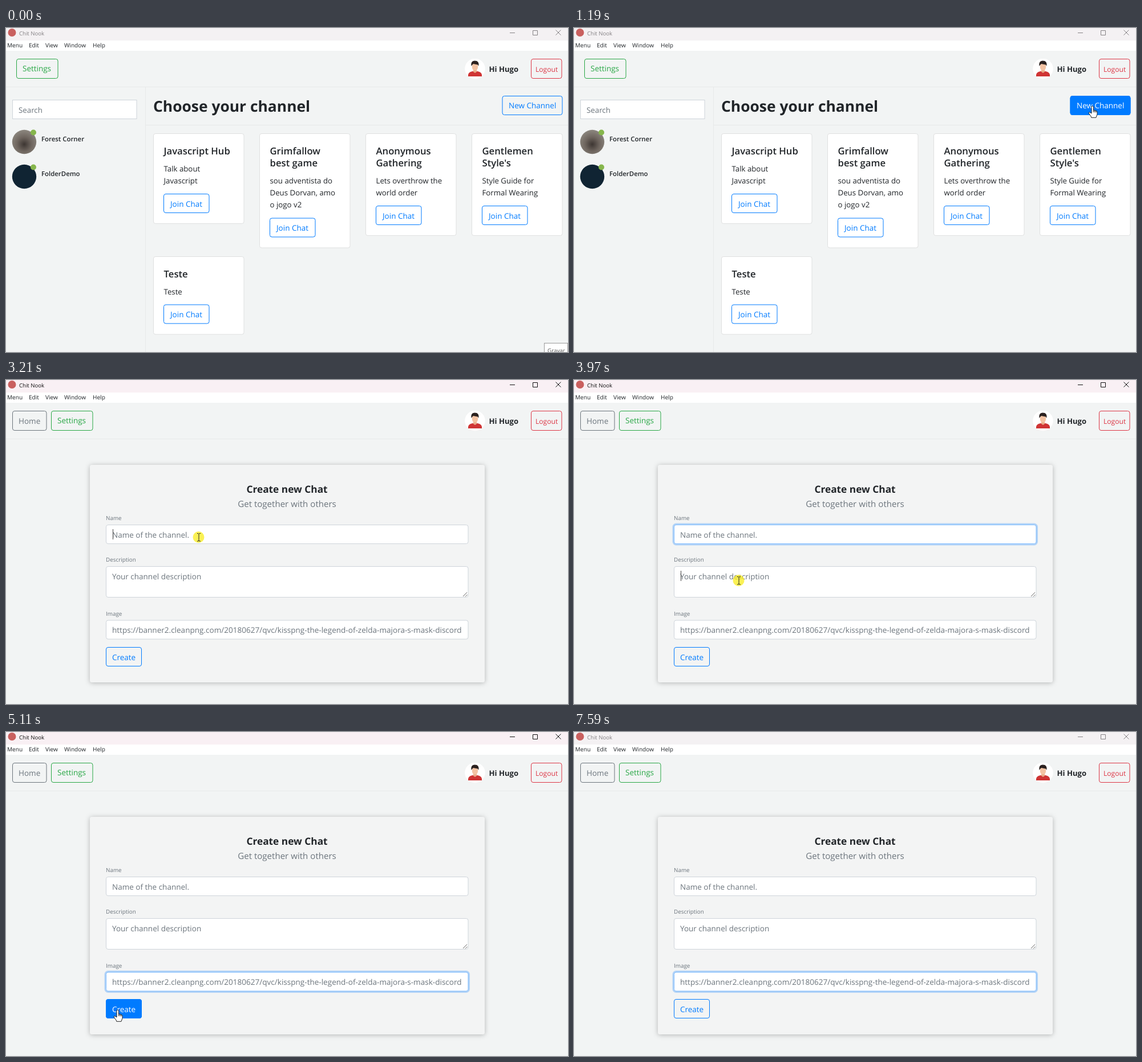
Recreate the animation shown at these times as an HTML page. Size 985x569 px, loop 7680 ms.

```html
<!DOCTYPE html>
<html lang="en">
<head>
<meta charset="utf-8">
<title>Chat channels</title>
<style>
  html, body { margin: 0; height: 100%; overflow: hidden; background: #f2f4f4; }
  svg { display: block; width: 985px; height: 569px; text-rendering: geometricPrecision;
        font-family: "Open Sans", "Noto Sans", sans-serif; }
  .panel { filter: drop-shadow(0 1px 4px rgba(0, 0, 0, .26)); }
</style>
</head>
<body>
<svg id="stage" viewBox="0 0 985 569"></svg>
<script>
const LOOP = 7680, BLUE = '#007bff', GREY = '#6c757d', INK = '#212529', GREEN = '#28a745', RED = '#dc3545';

// Drawing helpers, all returning SVG markup
const text = (x, y, s, size = 13.5, fill = INK, weight = 400, extra = '') =>
  `<text x="${x}" y="${y}" font-size="${size}" fill="${fill}" font-weight="${weight}" ${extra}>${s}</text>`;
const rect = (x, y, w, h, fill, stroke = 'none', r = 0, extra = '') =>
  `<rect x="${x}" y="${y}" width="${w}" height="${h}" rx="${r}" fill="${fill}" stroke="${stroke}" ${extra}/>`;
const circle = (x, y, r, fill) => `<circle cx="${x}" cy="${y}" r="${r}" fill="${fill}"/>`;
const path = (d, extra) => `<path d="${d}" ${extra}/>`;
const line = (d, color) => path(d, `fill="none" stroke="${color}"`);
const group = (id, ...parts) => `<g id="${id}">${parts.join('')}</g>`;
const button = (x, y, w, h, tx, ty, s, color, size, fill = 'none') =>
  rect(x, y, w, h, fill, fill === 'none' ? color : fill, 3.5) +
  text(tx, ty, s, size, fill === 'none' ? color : '#fff');

const settings = x => button(x + .5, 54.5, 72.5, 34, x + 11, 76, 'Settings', GREEN);

function card(x, y, h, title, body) {
  let base = y + 36.5;
  let out = rect(x + .5, y + .5, 158.5, h, '#fff', '#dfe0e0', 3.5);
  title.forEach((s, i) => out += text(x + 18.5, base + i * 21, s, 16.7, INK, 600));
  base += title.length * 21 + 9;
  body.forEach((s, i) => out += text(x + 18.5, base + i * 21.2, s, 13.25));
  return out + button(x + 18.5, y + h - 51.5, 79.5, 33, x + 30, y + h - 29.5, 'Join Chat', BLUE);
}

function contact(y, name, picture) {
  return circle(32, y, 21.2, picture) + circle(48, y - 16.5, 5, '#86b64c') +
    text(62, y - 1.5, name, 11.4, INK, 600);
}

function field(id, y, h, label, hint, size = 13.5) {
  return text(175, y - 8, label, 9.9, GREY) +
    rect(175.5, y + .5, 634.5, h, '#fff', '#ced4da', 3.5) +
    group(id + 'Ring',
      rect(174, y - 1, 637.5, h + 3, 'none', BLUE, 5, 'stroke-width="3" stroke-opacity=".27"'),
      rect(175.5, y + .5, 634.5, h, '#fff', '#80bdff', 3.5)) +
    text(186, y + 22.5, hint, size, GREY) +
    group(id + 'Caret', line(`M187.5 ${y + 8}v18`, '#444'));
}

const chrome =
  rect(0, 0, 985, 22, '#f4f1f3') +
  group('active', rect(0, 0, 985, 22, '#f9f0f4')) +
  circle(10.5, 8, 7, '#c9605f') +
  group('title',
    text(23, 12.5, 'Chit Nook', 9.6, 'currentColor'),
    line('M883 8.5h9M923.5 4.5h8v8h-8zM963.5 3.5l9 9m0-9l-9 9', 'currentColor')) +
  rect(0, 22, 985, 18, '#fff') +
  [[2, 'Menu'], [40, 'Edit'], [69, 'View'], [102, 'Window'], [152, 'Help']]
    .map(([x, s]) => text(x, 34, s, 10.1)).join('') +
  line('M0 103.5H985', '#e7e9e9') +
  circle(822, 71.5, 17.8, '#fff') +
  path('M810 85V82Q811 77 818 76H826Q833 77 834 82V85Z', 'fill="#cf3434"') +
  path('M819 72h6v5l-3 2l-3-2z', 'fill="#e9ab88"') +
  `<ellipse cx="822" cy="68" rx="5.2" ry="7" fill="#f4c3a3"/>` +
  path('M815.5 67Q814 58 821 57.5Q830 57 828.3 67L826.8 64.5L819 63L817 65Z', 'fill="#2b211f"') +
  text(846.5, 77, 'Hi Hugo', 13.1, INK, 700) +
  button(920.5, 54.5, 53.5, 34, 928, 77, 'Logout', RED, 12.1);

const home = group('home',
  settings(18),
  line('M244.5 104V569M245 170.5H985', '#e7e9e9'),
  rect(11.5, 126.5, 217.5, 33, '#fff', '#ced4da'),
  text(22, 149, 'Search', 13.3, GREY),
  contact(200, 'Forest Corner', 'url(#fur)'),
  contact(261, 'FolderDemo', '#102433'),
  text(258, 147, 'Choose your channel', 26.4, INK, 700),
  button(870, 119.5, 105, 33, 881, 141, 'New Channel', BLUE),
  group('newHover', button(870, 119.5, 105, 33, 881, 141, 'New Channel', BLUE, 13.5, BLUE)),
  card(258, 185, 158, ['Javascript Hub'], ['Talk about', 'Javascript']),
  card(444, 185, 200.5, ['Grimfallow', 'best game'], ['sou adventista do', 'Deus Dorvan, amo', 'o jogo v2']),
  card(630, 185, 179, ['Anonymous', 'Gathering'], ['Lets overthrow the', 'world order']),
  card(816, 185, 179, ['Gentlemen', "Style's"], ['Style Guide for', 'Formal Wearing']),
  card(258, 401, 136.5, ['Teste'], ['Teste']),
  group('tip', rect(943.5, 553.5, 41, 20, '#fff', '#9a9a9a'), text(949, 570, 'Gravar', 9.8, '#555')));

const form = group('form',
  button(11.5, 54.5, 59.5, 34, 22, 77, 'Home', GREY),
  settings(79),
  rect(147, 149, 692, 382, '#f3f4f4', 'none', 3.5, 'class="panel"'),
  text(492.5, 198, 'Create new Chat', 17.3, INK, 700, 'text-anchor="middle"'),
  text(492.5, 222.5, 'Get together with others', 15.1, GREY, 400, 'text-anchor="middle"'),
  field('name', 254, 33, 'Name', 'Name of the channel.'),
  field('about', 327, 54, 'Description', 'Your channel description'),
  line('M801 380l7-7M805 380.5l3.5-3.5', '#666'),
  field('image', 421.5, 33, 'Image',
    'https://banner2.cleanpng.com/20180627/qvc/kisspng-the-legend-of-zelda-majora-s-mask-discord', 13.55),
  button(175.5, 469.5, 62, 33, 186, 491.5, 'Create', BLUE),
  group('createHover', button(175.5, 469.5, 62, 33, 186, 491.5, 'Create', BLUE, 13.5, BLUE)));

const pointer = group('pointer',
  group('glow', circle(-.5, 0, 10, 'rgba(250,236,20,.72)')),
  group('arrow', path('M.5 .5V14.5L3.7 11.5L5.8 16.2L8 15.2L6 10.7H10.2Z',
    'fill="#fff" stroke="#222" stroke-linejoin="round"')),
  group('hand', path('M-1 1Q.7-1.2 2.4 1V7.2L6 8Q9.2 8.4 9 11V14.5L7 20.3H-1.2Q-2-17 -2 18L-5.6 13Q-6.3 10.8 -4.3 10.8L-1 13Z'
    .replace('Q-2-17 -2 18', 'L-2 18'), 'fill="#fff" stroke="#222" stroke-linejoin="round"'),
    line('M2.4 7V11M4.6 8V11.2M6.8 8.4V11.4', '#222')),
  group('beam', line('M-3 -6.5H-1L0 -5.5L1 -6.5H3M0 -5.5V6M-3 7H-1L0 6L1 7H3', '#222')));

const stage = document.getElementById('stage');
stage.innerHTML = `<defs><radialGradient id="fur" cx=".5" cy=".6" r=".6">
  <stop offset="0" stop-color="#3d3632"/><stop offset=".5" stop-color="#6f665f"/>
  <stop offset="1" stop-color="#8d8880"/></radialGradient></defs>` + chrome + home + form + pointer;

const $ = id => document.getElementById(id);
const show = (id, v) => $(id).setAttribute('opacity', +v);
const clamp = v => Math.min(1, Math.max(0, v));
const within = (t, a, b) => t >= a && t < b;
// Rises over 150 ms after a, falls over 150 ms after b
const fade = (t, a, b = Infinity) => clamp((t - a) / 150) - clamp((t - b) / 150);
const blink = (t, a, b = Infinity) => within(t, a, b) && (t - a) % 1075 < 530;

// Pointer moves: start, end, control point, end point
const moves = [
  [70, 580, 790, 180, 857, 146],
  [910, 1190, 885, 146, 908, 137],
  [2490, 3010, 620, 225, 338, 276],
  [3390, 3770, 325, 320, 289, 352],
  [4130, 4470, 288, 405, 283, 443],
  [4770, 5110, 235, 465, 195, 488],
  [5570, 5970, 245, 494, 297, 495],
  [5970, 6190, 302, 495, 306, 493],
  [6190, 6930, 620, 520, 934, 574]
];

function pointerAt(t) {
  let x = 962, y = 580;
  for (const [a, b, cx, cy, ex, ey] of moves) {
    if (t < a) break;
    const k = clamp((t - a) / (b - a)), u = k * k * (3 - 2 * k);
    const mix = (p, c, q) => (1 - u) * (1 - u) * p + 2 * u * (1 - u) * c + u * u * q;
    x = mix(x, cx, ex);
    y = mix(y, cy, ey);
  }
  return [x, y];
}

function shape(t, x, y) {
  const over = (l, top, r, bottom) => within(x, l, r) && within(y, top, bottom);
  if (t < 1870) return over(870, 119, 975, 153) ? 'hand' : 'arrow';
  if (over(175, 469, 238, 503)) return 'hand';
  return over(175, 254, 810, 288) || over(175, 327, 810, 382) || over(175, 421, 810, 455) ? 'beam' : 'arrow';
}

function draw(t) {
  const active = within(t, 1720, 7590), onForm = t >= 1870;
  show('active', active);
  $('title').setAttribute('color', active ? '#111' : '#858285');
  $('home').style.display = onForm ? 'none' : '';
  $('form').style.display = onForm ? '' : 'none';
  show('tip', t < 70);
  show('newHover', fade(t, 970));
  show('createHover', fade(t, 4950, 5660));
  show('nameRing', fade(t, 3210, 3970));
  show('aboutRing', fade(t, 3970, 4580));
  show('imageRing', fade(t, 4580));
  show('nameCaret', blink(t, 3210, 3970));
  show('aboutCaret', blink(t, 3970, 4580));
  show('imageCaret', blink(t, 4580));

  const [x, y] = pointerAt(t), kind = shape(t, x, y);
  $('pointer').setAttribute('transform', `translate(${Math.round(x)} ${Math.round(y)})`);
  for (const id of ['arrow', 'hand', 'beam']) show(id, id === kind);
  show('glow', [1720, 3210, 3970, 4580].some(c => within(t, c, c + 130)));
}

let start;
function tick(now) {
  start ??= now;
  draw((now - start) % LOOP);
  requestAnimationFrame(tick);
}
draw(0);
requestAnimationFrame(tick);
</script>
</body>
</html>
```
